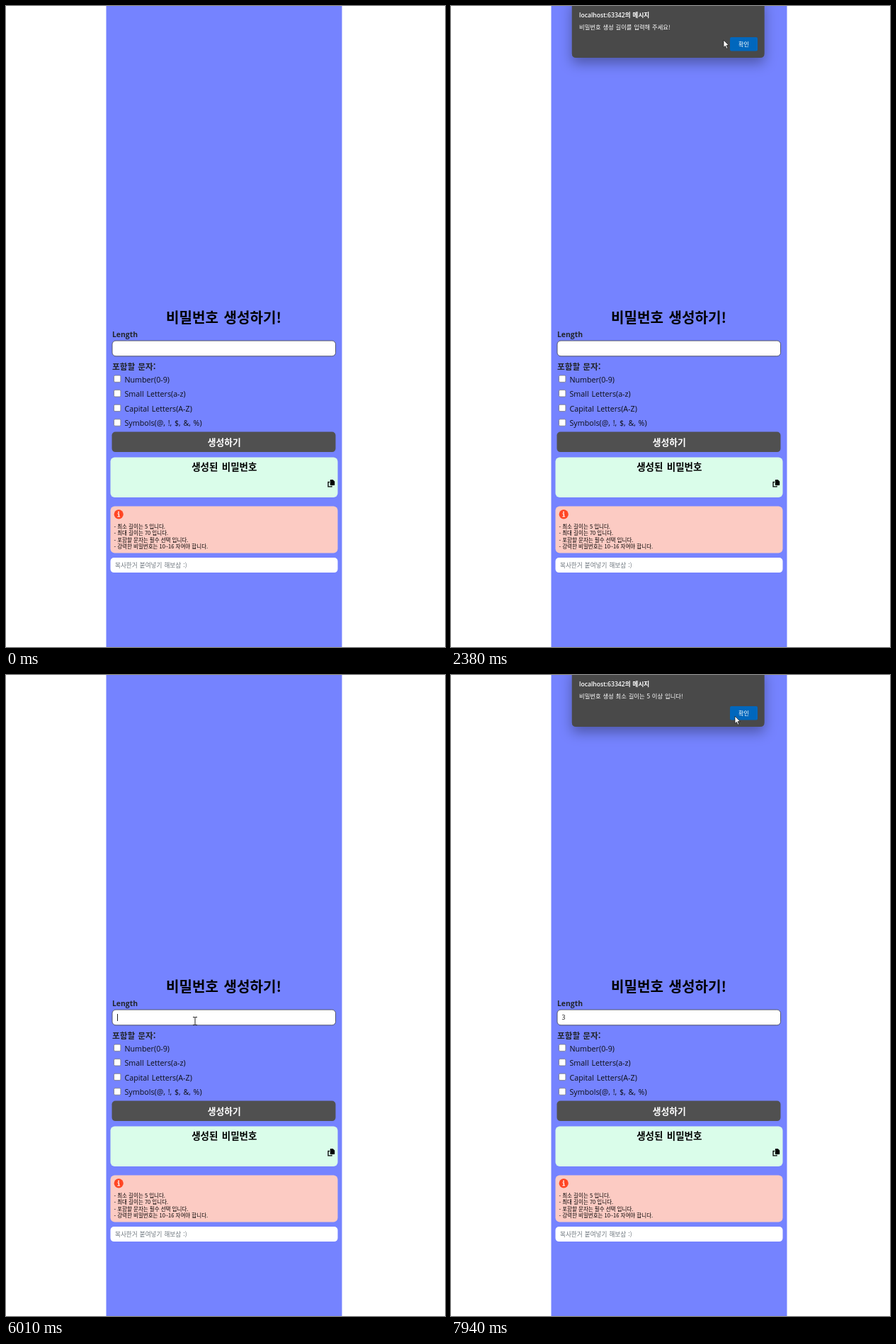
An HTML page that plays this animation: 620 px wide and 904 px high, repeating every 7990 ms.

```html
<!DOCTYPE html>
<html lang="ko">
<head>
<meta charset="utf-8">
<title>비밀번호 생성하기</title>
<style>
  html, body { margin: 0; width: 100%; height: 100%; overflow: hidden; background: #fff; }
  svg { display: block; width: 620px; height: 904px; }
  text { font-family: 'Open Sans', 'Noto Sans CJK KR', 'Noto Sans CJK', sans-serif; white-space: pre; }
  .ko { font-family: 'Noto Sans CJK KR', 'Noto Sans CJK', sans-serif; }
  .b { font-weight: 700; }
  .mid { text-anchor: middle; }
</style>
</head>
<body>
<svg viewBox="0 0 620 904" xmlns="http://www.w3.org/2000/svg">
  <defs>
    <filter id="shade" x="-20%" y="-50%" width="140%" height="220%">
      <feDropShadow dx="0" dy="8" stdDeviation="9" flood-color="#000" flood-opacity=".33"/>
    </filter>
  </defs>
  <rect x="141.5" width="333" height="904" fill="#7583ff"/>

  <g transform="translate(-.5 -.4)">
    <rect x="150.5" y="472.5" width="315.5" height="21.7" rx="5" fill="#fff" stroke="#484b5c" stroke-width=".9"/>
    <rect x="150" y="601" width="316" height="28.5" rx="5" fill="#505050"/>
    <rect x="148" y="637" width="321" height="56.5" rx="6" fill="#dafdea"/>
    <rect x="148" y="706" width="321" height="66" rx="6" fill="#fccbc3"/>
    <rect x="148" y="778.5" width="321" height="21" rx="5" fill="#fff"/>
  </g>

  <text class="ko b" x="226" y="447.3" font-size="20.1" word-spacing="2">비밀번호 생성하기!</text>
  <text class="b" x="150" y="467" font-size="10.4" fill="#212529">Length</text>
  <text id="digit" x="156.5" y="486.2" font-size="8.6" fill="#111">3</text>
  <rect id="caret" x="157" y="478" width="1" height="10" fill="#222"/>
  <text class="ko b" x="150" y="513.4" font-size="11.7" word-spacing=".8" fill="#212529">포함할 문자:</text>
  <g id="options"></g>
  <text class="ko b mid" x="308.3" y="619.8" font-size="12.8" fill="#fff">생성하기</text>
  <text class="ko b mid" x="308.3" y="655" font-size="13.5" word-spacing="1.5">생성된 비밀번호</text>

  <path d="M458.6 668h3l2.6 2.600v4.600q0 .8-.8.8h-4.800q-.8 0-.8-.8v-6.400q0-.8.8-.8z"/>
  <path d="M457 671.5h-2v6.300h5v-1" fill="none" stroke="#000" stroke-width="1.3"/>

  <circle cx="159.2" cy="716.8" r="6.6" fill="#ff4624"/>
  <circle cx="159" cy="713.7" r="1" fill="#fff"/>
  <path d="M157.5 716.100h1.900v3.900M157.300 720h3.800" fill="none" stroke="#fff" stroke-width="1.2"/>
  <g id="notes"></g>
  <text class="ko" x="154" y="791.5" font-size="8.6" word-spacing=".7" fill="#6c757d">복사한거 붙여넣기 해보삼 :)</text>

  <g id="dialog">
    <path d="M170.700-10H442.700V67q0 6-6 6H176.700q-6 0-6-6z" fill="#4a4a4a" filter="url(#shade)"/>
    <text x="181" y="15.8" font-size="8.65" font-weight="600" word-spacing=".6" fill="#fff">localhost:63342의 메시지</text>
    <text id="message" class="ko" x="181" y="32.9" font-size="8.32" word-spacing=".5" fill="#fff"></text>
    <rect id="ok" x="394" y="44" width="39" height="19.5" rx="2"/>
    <text class="ko mid" x="413.5" y="56.6" font-size="8.2" fill="#fff">확인</text>
  </g>

  <g id="cursor">
    <path id="arrow" d="M0 0V10.400L2.400 8.300 4.100 12.200 5.800 11.500 4.100 7.600H7.400Z" fill="#fff" stroke="#111" stroke-width=".7"/>
    <path id="hand" transform="scale(1.1)" d="M-1.300 8V1.200a1.200 1.200 0 0 1 2.400 0V5l3 .6q1.500.4 1.500 2v2q0 2-1 3.900H-1.700L-4.300 9.200q-.5-1.400.6-1.700 1-.2 2.400 1.700z" fill="#fff" stroke="#222" stroke-width=".6"/>
    <path id="beam" d="M-3-5.500h2.200L0-5 .8-5.500H3M0-5V5M-3 5.500h2.200L0 5 .8 5.500H3" fill="none" stroke="#222"/>
  </g>
</svg>
<script>
const LOOP = 7990, STEP = 50, BLINK = 530;
const OPEN = 1880, CLOSE = 3880, TYPED = 6310, REOPEN = 7320;
const $ = id => document.getElementById(id);
const show = (el, on) => el.setAttribute('visibility', on ? 'visible' : 'hidden');
const within = (v, a, b) => v >= a && v < b;
const clamp = v => Math.max(0, Math.min(1, v));
const ease = f => f * f * (3 - 2 * f);
const since = (t, start) => Math.floor((t - start) / STEP) * STEP;

function add(parent, tag, attrs, text = '') {
  const el = document.createElementNS('http://www.w3.org/2000/svg', tag);
  for (const k in attrs) el.setAttribute(k, attrs[k]);
  el.textContent = text;
  return parent.appendChild(el);
}

const rowY = i => 526 + i * 20.6;
const boxes = ['Number(0-9)', 'Small Letters(a-z)', 'Capital Letters(A-Z)', 'Symbols(@, !, $, &, %)'].map((label, i) => {
  add($('options'), 'text', { x: 167.5, y: rowY(i) + 4.5, 'font-size': 10.7, 'word-spacing': 1, fill: '#0c0e14' }, label);
  return add($('options'), 'rect', { x: 152.5, y: rowY(i) - 5, width: 9.4, height: 9.4, rx: 1.5, fill: '#fff', 'stroke-width': 0.8 });
});

['최소 길이는 5 입니다.', '최대 길이는 70 입니다.', '포함할 문자는 필수 선택 입니다.', '강력한 비밀번호는 10~16 자여야 합니다.'].forEach((line, i) =>
  add($('notes'), 'text', { class: 'ko', x: 152.5, y: 736.5 + i * 9.6, 'font-size': 7.5 }, '- ' + line));

// Pointer strokes: start and end time, bend point, end point; each begins where the last one stopped.
const entry = [604, 890];
const strokes = [
  [50, 820, [180, 310], [255, 560]],
  [870, 1570, [395, 835], [308, 606]],
  [OPEN, 2380, [320, 200], [385, 48]],
  [2380, 2700, [400, 50], [413, 54]],
  [CLOSE, 4080, [370, 150], [303, 370]],
  [4080, 4750, [275, 560], [267, 488]],
  [6770, 7170, [262, 630], [289, 606]],
  [REOPEN, 7490, [350, 150], [412, 8]],
  [7540, 7940, [365, 60], [401, 58]]
];

function pointer(t) {
  const n = strokes.filter(s => s[0] <= t).length - 1;
  if (n < 0) return null;
  const [start, end, bend, to] = strokes[n];
  const from = n ? strokes[n - 1][3] : entry;
  const f = ease(clamp(since(t, start) / (end - start)));
  return [0, 1].map(i => Math.round((1 - f) ** 2 * from[i] + 2 * f * (1 - f) * bend[i] + f * f * to[i]));
}

function shape(x, y, modal) {
  if (modal || !within(x, 150, 466)) return 'arrow';
  if (within(y, 601, 629)) return 'hand';
  return within(y, 472, 494) || within(y, 778, 799) ? 'beam' : 'arrow';
}

function dialogAlpha(t) {
  if (within(t, CLOSE, REOPEN)) return clamp(0.6 - since(t, CLOSE) / 160);
  return clamp(0.01 + since(t, t < CLOSE ? OPEN : REOPEN) / 150);
}

function draw(t) {
  const modal = within(t, OPEN, CLOSE) || t >= REOPEN;
  const alpha = t < OPEN ? 0 : dialogAlpha(t);
  show($('dialog'), alpha > 0);
  $('dialog').setAttribute('opacity', alpha);
  $('message').textContent = t < TYPED ? '비밀번호 생성 길이를 입력해 주세요!' : '비밀번호 생성 최소 길이는 5 이상 입니다!';
  $('ok').setAttribute('fill', within(t, 2850, TYPED) ? '#0b6fc4' : '#0067bd');

  show($('digit'), t >= TYPED);
  show($('caret'), within(t, CLOSE, TYPED) && Math.floor((t - CLOSE) / BLINK) % 2 === 0);

  const p = pointer(t);
  show($('cursor'), p);
  const kind = p && shape(...p, modal);
  for (const id of ['arrow', 'hand', 'beam']) $(id).setAttribute('display', id === kind ? 'inline' : 'none');
  if (p) $('cursor').setAttribute('transform', `translate(${p})`);
  boxes.forEach((box, i) => {
    const hover = p && !modal && within(p[0], 152, 280) && Math.abs(p[1] - rowY(i)) < 9;
    box.setAttribute('stroke', hover ? '#3c3c3c' : '#767676');
  });
}

const began = performance.now();
function tick() {
  draw((performance.now() - began) % LOOP);
  requestAnimationFrame(tick);
}
tick();
</script>
</body>
</html>
```
